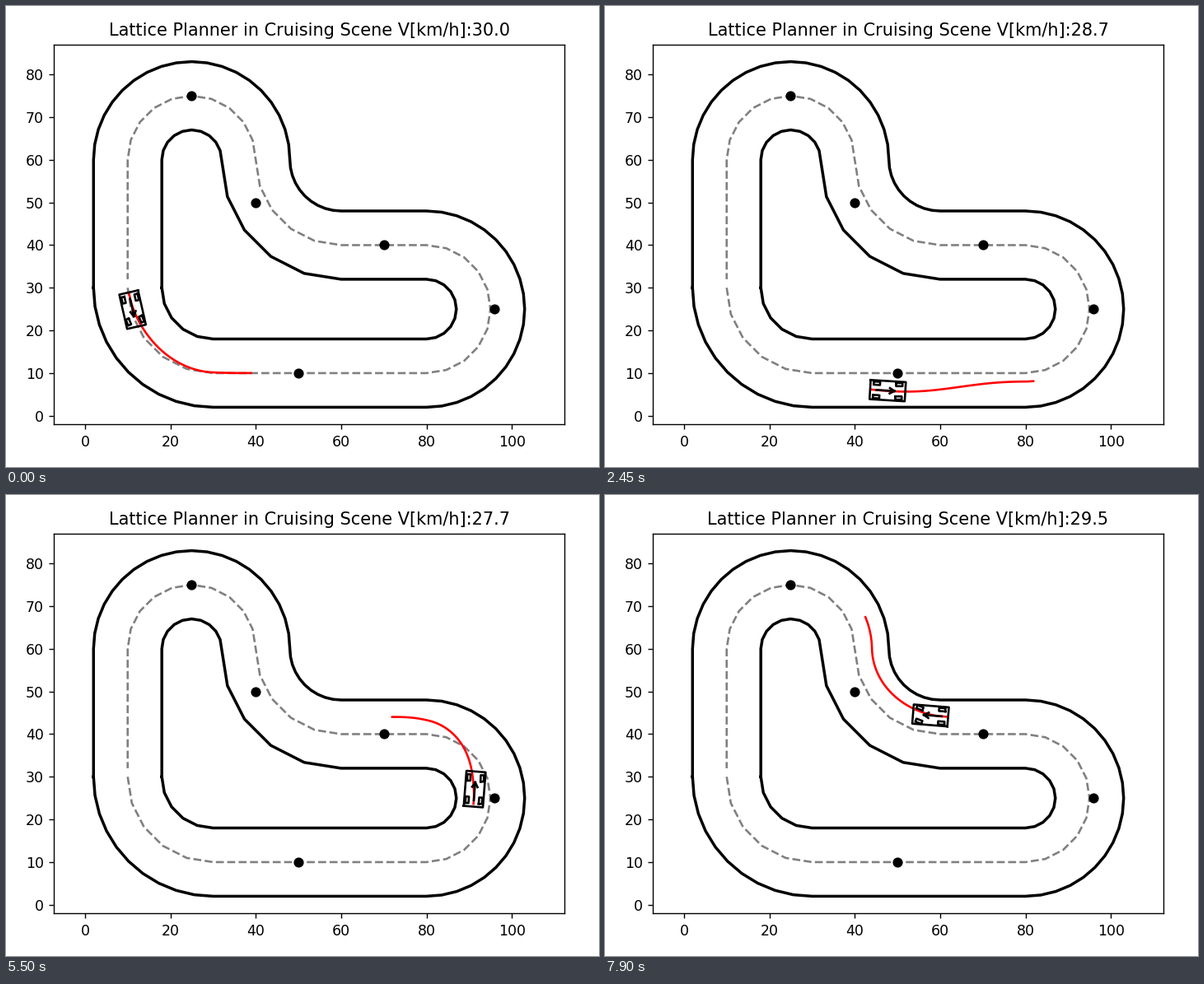
A matplotlib script for the animation above (8000 ms loop, 720 px wide and 560 px high).

```python
import numpy as np
import matplotlib.pyplot as plt
from matplotlib.animation import FuncAnimation

DPI = 125
SLOT = 50                    # ms per animation frame
SLOTS = 160
STEP = 1.155                 # distance driven in one planning step

# vehicle size
K = 1.5
RF, RB, W, WB = 4.5 * K, 1.0 * K, 3.0 * K, 3.5 * K
WD, TR, TW = 0.7 * W, 0.5 * K, 1.0 * K
MAX_STEER = 0.6

# key poses: distance, lateral offset, its slope, planned offset, km/h
POSES = np.array([(2.6, .4, .09, 0, 30.0),
                  (26.9, -.5, -.09, -5, 27.9),
                  (46.5, -3.96, -.06, -2, 28.7),
                  (82.3, .45, .35, 6, 27.5),
                  (104.2, 3.9, -.02, -4, 27.7),
                  (119.2, .4, -.32, -5, 27.6),
                  (148.1, -4.14, -.08, -4, 29.5)])
KEY_S, KEY_L, KEY_SLOPE, KEY_GOAL, KEY_V = POSES.T


def arc(cx, cy, r, a0, a1, step):
    a = np.radians(np.linspace(a0, a1, round(abs(a1 - a0) / step) + 1))
    return np.column_stack([cx + r * np.cos(a), cy + r * np.sin(a)])


def lane(d, step=18):
    """Track outline shifted inwards by d, corners cut every step degrees."""
    return np.vstack([arc(30, 30, 20 - d, 180, 270, step),
                      arc(80, 25, 15 - d, -90, 90, step),
                      arc(60, 60, 20 + d, -90, -180, step),
                      arc(25, 60, 15 - d, 0, 180, step)])


# smooth centre line as a table over s
DS = 0.02
S = np.arange(0, 225, DS)
ENDS = np.cumsum([10 * np.pi, 50, 15 * np.pi, 20, 10 * np.pi])
BENDS = np.array([1 / 20, 0, 1 / 15, 0, -1 / 20, 1 / 15])
CURV = BENDS[np.searchsorted(ENDS, S + DS / 2)]
YAW = -np.pi / 2 + np.cumsum(CURV) * DS
CX = 10 + np.cumsum(np.cos(YAW)) * DS
CY = 30 + np.cumsum(np.sin(YAW)) * DS


def to_xy(s, l):
    yaw = np.interp(s, S, YAW)
    return (np.interp(s, S, CX) - l * np.sin(yaw),
            np.interp(s, S, CY) + l * np.cos(yaw))


def offset(s):
    """Driven lateral offset: cubic Hermite through the key poses."""
    i = int(np.clip(np.searchsorted(KEY_S, s) - 1, 0, len(KEY_S) - 2))
    h = KEY_S[i + 1] - KEY_S[i]
    u = (s - KEY_S[i]) / h
    ease = u * u * (3 - 2 * u)
    return (KEY_L[i] * (1 - ease) + KEY_L[i + 1] * ease
            + h * u * (1 - u) * (KEY_SLOPE[i] * (1 - u) - KEY_SLOPE[i + 1] * u))


def heading(s, e=0.2):
    x0, y0 = to_xy(s - e, offset(s - e))
    x1, y1 = to_xy(s + e, offset(s + e))
    return np.arctan2(y1 - y0, x1 - x0)


def plan(s):
    """Quintic from one step behind the rear axle to a whole-metre goal."""
    s0, e = s - STEP, 0.2
    l0 = offset(s0)
    slope = (offset(s0 + e) - offset(s0 - e)) / (2 * e)
    goal = np.round(np.interp(s, KEY_S, KEY_GOAL))
    length = 39 - 0.7 * abs(goal - l0)       # wide swerves end sooner
    u = np.linspace(0, 1, 34)
    l = (l0 + (goal - l0) * (10 * u**3 - 15 * u**4 + 6 * u**5)
         + slope * length * (u - 6 * u**3 + 8 * u**4 - 3 * u**5))
    return to_xy(s0 + u * length, l)


def rot(pts, a):
    c, s = np.cos(a), np.sin(a)
    return np.array([[c, -s], [s, c]]) @ pts


def box(x0, x1, half):
    return np.array([[x0, x0, x1, x1, x0], [half, -half, -half, half, half]])


def car_shapes(x, y, yaw, steer):
    """Body, four wheels and the three strokes of the arrow."""
    shapes = [box(-RB, RF, W / 2)]
    wheel = box(-TR, TR, TW / 4)
    for wx, turn in ((WB, steer), (0, 0)):
        for wy in (-WD / 2, WD / 2):
            shapes.append(rot(wheel, turn) + [[wx], [wy]])
    tip = 0.8 * WB
    shapes.append(np.array([[0, tip], [0, 0]]))
    for side in (-1, 1):
        a = np.pi + side * np.pi / 6
        shapes.append(np.array([[tip, tip + 0.3 * tip * np.cos(a)],
                                [0, 0.3 * tip * np.sin(a)]]))
    return [rot(p, yaw) + [[x], [y]] for p in shapes]


fig = plt.figure(figsize=(720 / DPI, 560 / DPI), dpi=DPI, facecolor="white")
ax = fig.add_axes([58 / 720, 51.6 / 560, 620 / 720, 461.8 / 560])
scale = 461.8 / 89.1         # pixels per unit, equal on both axes
ax.set_xlim(52.5 - 310 / scale, 52.5 + 310 / scale)
ax.set_ylim(-2.05, 87.05)
ax.set_xticks(range(0, 101, 20))
ax.set_yticks(range(0, 81, 10))

centre = np.vstack([lane(0), [(10, 32)]])
ax.plot(*centre.T, "--", color="gray", lw=1.5)
for edge in (lane(8), lane(-8, 9)):
    ax.plot(*np.vstack([edge, edge[:1]]).T, color="k", lw=2)
path_line, = ax.plot([], [], color="r", lw=1.5)
ax.plot([50, 96, 70, 40, 25], [10, 25, 40, 50, 75], "ok")
car_lines = [ax.plot([], [], color="k", lw=1.5)[0] for _ in range(8)]
title = ax.set_title("")


def update(frame):
    steps = max(0, int(0.81 * frame - 1.05))
    s = KEY_S[0] + STEP * steps
    path_line.set_data(*plan(s))
    yaw = heading(s)
    bend = (heading(s + 0.6) - yaw + np.pi) % (2 * np.pi) - np.pi
    steer = np.clip(np.arctan(WB * bend / 0.6), -MAX_STEER, MAX_STEER)
    x, y = to_xy(s, offset(s))
    for line, pts in zip(car_lines, car_shapes(x, y, yaw, steer)):
        line.set_data(*pts)
    speed = np.interp(s, KEY_S, KEY_V)
    title.set_text(f"Lattice Planner in Cruising Scene V[km/h]:{speed:.1f}")
    return [path_line, title, *car_lines]


anim = FuncAnimation(fig, update, frames=SLOTS, interval=SLOT, repeat=True,
                     repeat_delay=0, blit=False)
plt.show()
```
